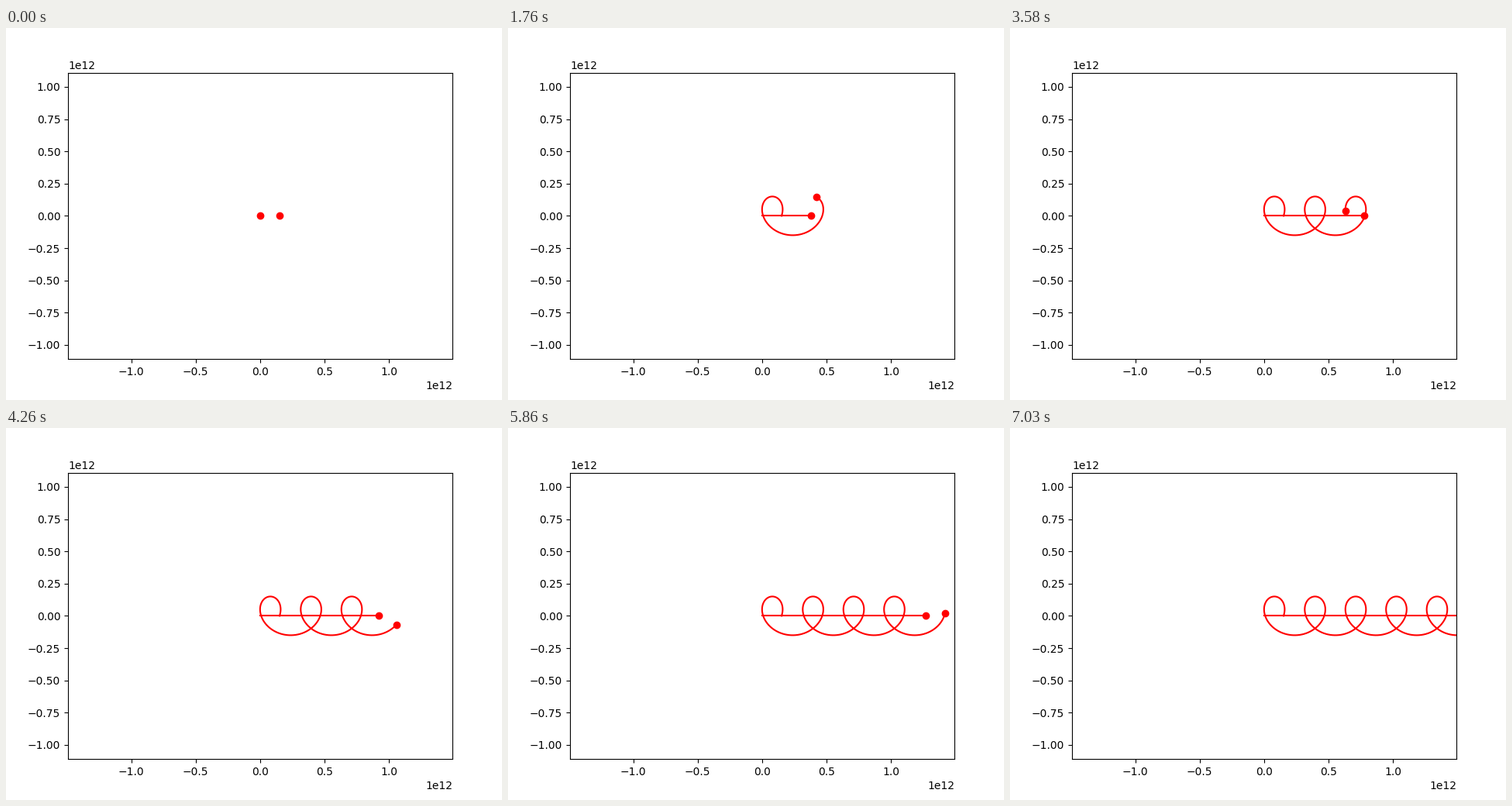
A matplotlib script for the animation above (7.43 s loop, 640 px wide and 480 px high).

```python
import numpy as np
import matplotlib.pyplot as plt
from matplotlib.animation import FuncAnimation

LOOP_MS, TICK_MS, STEP_MS = 7430, 10, 20
ORBIT = 1.5015e11               # orbit radius, m
DRIFT = 4.328e9                 # star travel per step, m
TURN = np.radians(4.9445)       # planet turn per step
Y_MAX = 1.11e12
X_MAX = Y_MAX * 496 / 369.6     # equal scale on both axes

plt.rcParams["font.family"] = "DejaVu Sans"
fig, ax = plt.subplots(figsize=(6.4, 4.8), dpi=100)
ax.set_xlim(-X_MAX, X_MAX)
ax.set_ylim(-Y_MAX, Y_MAX)
ax.set_autoscale_on(False)
# Ticks are plain artists, which redraw much faster than the axis objects.
ax.xaxis.set_visible(False)
ax.yaxis.set_visible(False)


def label(text, xy, coords, offset, ha, va):
    ax.annotate(text, xy, xycoords=coords, xytext=offset,
                textcoords="offset points", ha=ha, va=va,
                fontsize=10, annotation_clip=False)


def number(value, digits):
    return f"{value:.{digits}f}".replace("-", "\u2212")


def marks(x, y, marker, transform):
    ax.plot(x, y, ls="", marker=marker, ms=3.5, mew=0.8, color="black",
            transform=transform, clip_on=False)


x_ticks = np.arange(-2, 3) * 0.5
y_ticks = np.arange(-4, 5) * 0.25
x_trans, y_trans = ax.get_xaxis_transform(), ax.get_yaxis_transform()
marks(x_ticks * 1e12, np.zeros(5), 3, x_trans)
marks(np.zeros(9), y_ticks * 1e12, 0, y_trans)
for v in x_ticks:
    label(number(v, 1), (v * 1e12, 0), x_trans, (0, -7), "center", "top")
for v in y_ticks:
    label(number(v, 2), (0, v * 1e12), y_trans, (-7, 0), "right",
          "center_baseline")
label("1e12", (1, 0), "axes fraction", (0, -20.1), "right", "top")
label("1e12", (0, 1), "axes fraction", (0, 3), "left", "baseline")

steps = np.arange(LOOP_MS // STEP_MS + 1)
star = np.column_stack([DRIFT * steps, 0 * steps])
planet = star + ORBIT * np.column_stack([np.cos(TURN * steps),
                                         np.sin(TURN * steps)])
paths = (star, planet)
trails = [ax.plot([], [], "r-", lw=1.5)[0] for _ in paths]
dots = [ax.plot([], [], "ro", ms=6)[0] for _ in paths]


def update(frame):
    n = frame * TICK_MS // STEP_MS
    for path, trail, dot in zip(paths, trails, dots):
        trail.set_data(*path[:n + 1].T)
        dot.set_data(*path[n:n + 1].T)
    return trails + dots


anim = FuncAnimation(fig, update, frames=LOOP_MS // TICK_MS,
                     interval=TICK_MS, repeat=True, repeat_delay=0)
plt.show()
```
